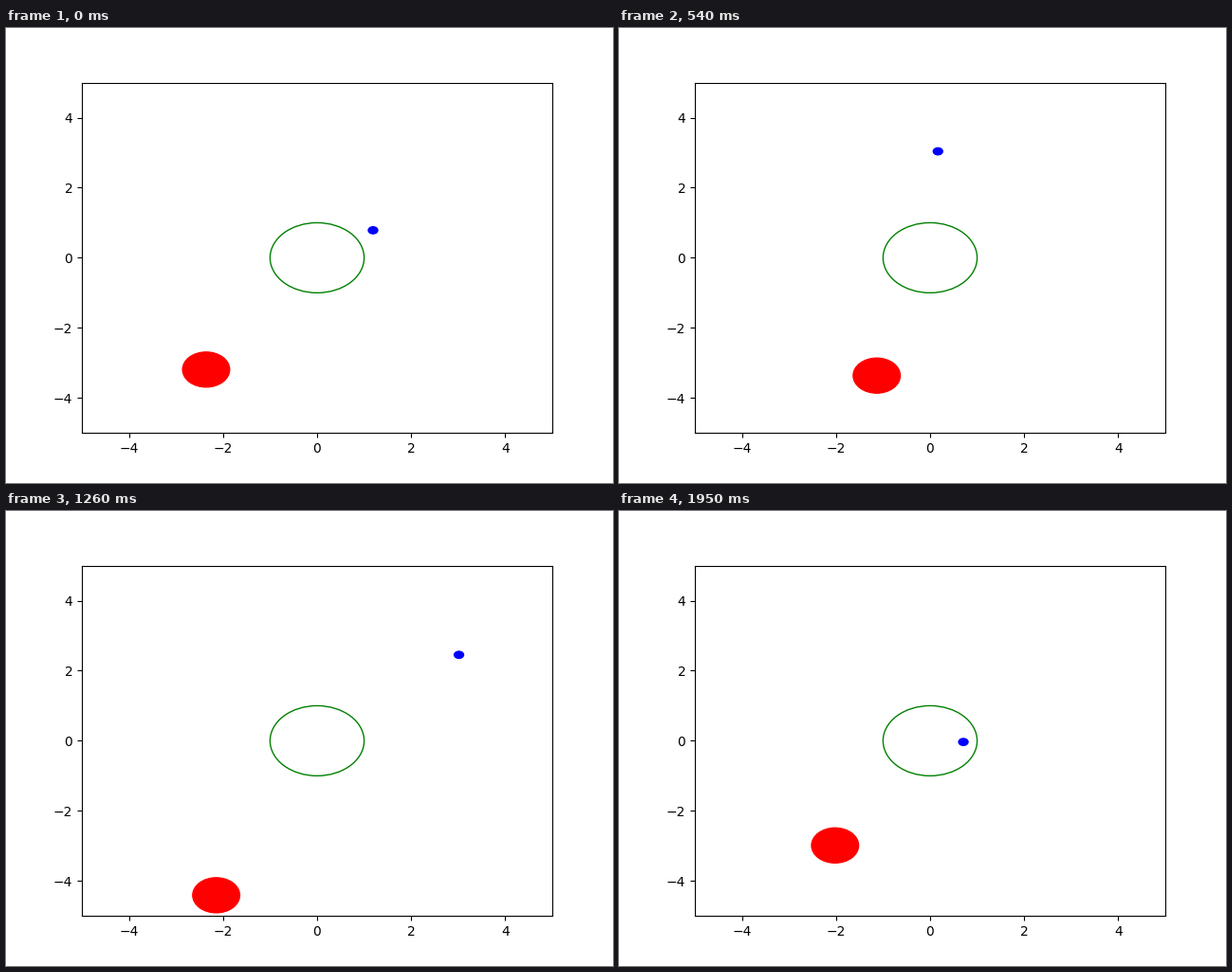
A matplotlib script for the animation above (1.98 s loop, 640x480 px).

```python
import numpy as np
import matplotlib.pyplot as plt
from matplotlib.animation import FuncAnimation
from matplotlib.patches import Circle

FRAMES, INTERVAL = 66, 30
TURN = 6.0  # degrees per step


def drive(start, heading, speed, turns):
    """Positions of a car that moves at constant speed and turns a bit each step."""
    angles = np.radians(heading + np.cumsum(turns))
    steps = speed * np.column_stack([np.cos(angles), np.sin(angles)])
    return np.vstack([start, start + np.cumsum(steps, axis=0)])


# The chaser always turns right; the runner swings over to the left near the end.
right = np.full(FRAMES - 1, -TURN)
swerve = right.copy()
swerve[56] = -TURN / 2
swerve[57:] = TURN

chaser_path = drive(np.array([-2.359, -3.191]), 46 + TURN / 2, 0.08, right)
runner_path = drive(np.array([1.189, 0.785]), 168.4 + TURN / 2, 0.16, swerve)

fig, ax = plt.subplots(figsize=(6.4, 4.8), dpi=100)
ax.set_xlim(-5, 5)
ax.set_ylim(-5, 5)

goal = ax.add_patch(Circle((0, 0), 1, color="g", fill=False))
chaser = ax.add_patch(Circle(chaser_path[0], 0.5, color="r"))
runner = ax.add_patch(Circle(runner_path[0], 0.1, color="b"))


def update(i):
    chaser.center = chaser_path[i]
    runner.center = runner_path[i]
    return chaser, runner


anim = FuncAnimation(fig, update, frames=FRAMES, interval=INTERVAL,
                     repeat=True, repeat_delay=0)
plt.show()
```
